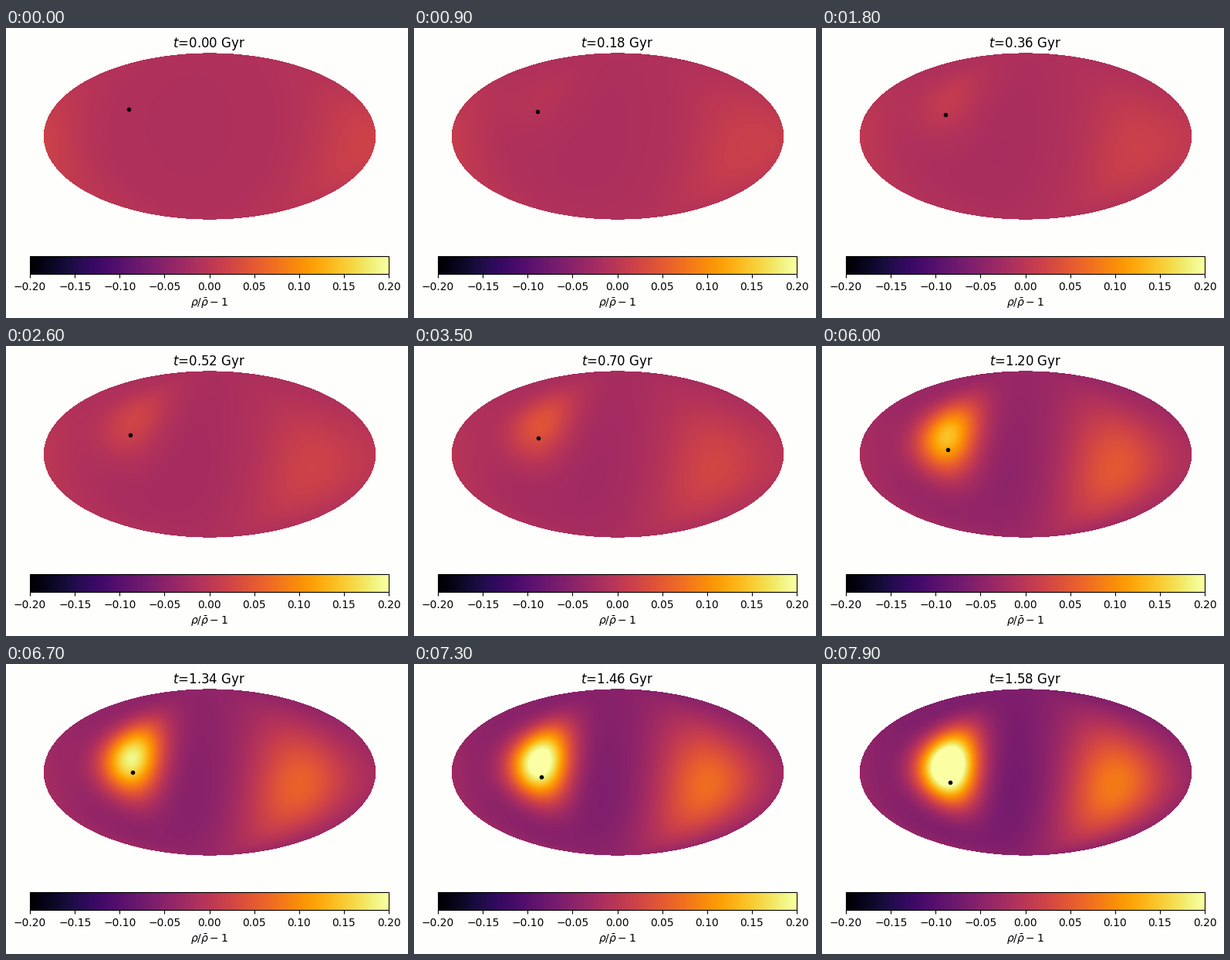
These frames come from a looping animation (521x375 px, 8 s). A matplotlib script:

```python
import numpy as np
import matplotlib.pyplot as plt
from matplotlib.animation import FuncAnimation
from matplotlib.cm import ScalarMappable
from matplotlib.colors import Normalize

W, H, DPI = 521, 375, 100
FRAMES, STEP = 80, 100
CX, CY, RX, RY = 264, 140, 215.2, 107.6
BAR_X, BAR_W = 31.1, 465

# Inverse Mollweide projection: longitude and latitude of every pixel
px, py = np.meshgrid(np.arange(W) + 0.5, np.arange(H) + 0.5)
u, v = (px - CX) / RX, (CY - py) / RY
outside = u ** 2 + v ** 2 > 1
theta = np.arcsin(np.clip(v, -0.9999, 0.9999))
lon = np.pi * u / np.cos(theta)
lat = np.arcsin((2 * theta + np.sin(2 * theta)) / np.pi)


def spot(lon0, lat0, kappa):
    """Round bump on the sphere, 1 at its centre (degrees)."""
    lon0, lat0 = np.radians([lon0, lat0])
    cos_d = (np.sin(lat) * np.sin(lat0)
             + np.cos(lat) * np.cos(lat0) * np.cos(lon - lon0))
    return np.exp(kappa * (cos_d - 1))


def density(t):
    grow = np.exp(0.3 * t) - 1
    rho = -0.015 - 0.0061 * grow
    # Near side follows the dot, far side settles opposite to it
    rho = rho + 0.0375 * grow * spot(-93 + 1.1 * t, 37 - 2.2 * t - 0.23 * t ** 2, 6.5)
    rho += (0.026 + 0.0137 * grow) * spot(96 + 60 * np.exp(-t / 1.8), -11, 2)
    rho += 0.012 * spot(-175, 0, 4)
    rho -= 0.0012 * grow * spot(-10, -25, 2)
    return np.ma.array(rho, mask=outside)


def dot_place(t):
    fall = (t / 7.9) ** 4.5
    return 159.1 + 0.6 * t + 2.2 * fall, 104.6 + 4.1 * t + 16.4 * fall


fig = plt.figure(figsize=(W / DPI, H / DPI), dpi=DPI, facecolor="#fefefc")
ax = fig.add_axes([0, 0, 1, 1])
ax.axis("off")
norm = Normalize(-0.2, 0.2)
sky = ax.imshow(density(0), cmap="inferno", norm=norm, extent=(0, W, H, 0),
                aspect="auto", interpolation="nearest")
dot, = ax.plot([], [], "k.", ms=6)
title = ax.text(BAR_X + BAR_W / 2, 24.6, "", fontsize=12,
                ha="center", va="baseline")

cax = fig.add_axes([BAR_X / W, 57 / H, BAR_W / W, 23.25 / H])
bar = fig.colorbar(ScalarMappable(norm, "inferno"), cax=cax,
                   orientation="horizontal")
bar.set_label(r"$\rho/\bar{\rho}-1$")


def update(k):
    t = k * STEP / 1000
    x, y = dot_place(t)
    sky.set_data(density(t))
    dot.set_data([x], [y])
    title.set_text(f"$t$={0.02 * k:.2f} Gyr")
    return sky, dot, title


anim = FuncAnimation(fig, update, frames=FRAMES, interval=STEP,
                     repeat=True, repeat_delay=0)
plt.show()
```
